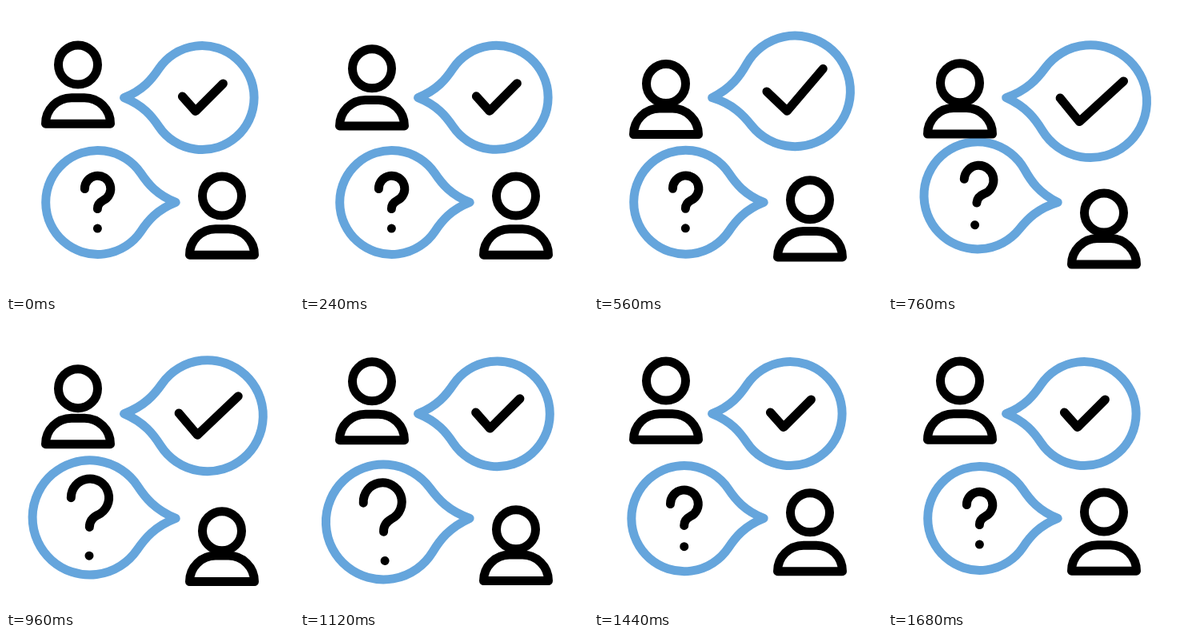
An HTML page that plays this animation: 360 px wide and 360 px high, repeating every 1720 ms.

```html
<!DOCTYPE html>
<html lang="en">
<head>
<meta charset="utf-8">
<title>Question and answer</title>
<style>
  html, body { margin: 0; width: 100%; height: 100%; overflow: hidden; background: #fff; }
  svg { display: block; }

  path, circle {
    fill: none;
    stroke: #000;
    stroke-width: 11px;
    stroke-linecap: round;
    stroke-linejoin: round;
    vector-effect: non-scaling-stroke;
  }
  .outline { stroke: #65a5dc; }

  .head, .body, .bubble, .mark {
    transform-origin: 0 0;
    animation: 1720ms cubic-bezier(.6, 0, .4, 1) var(--delay) infinite both;
  }
  .first { --delay: 0ms; --swell: 1.083; }
  .second { --delay: 320ms; --swell: 1.107; }

  .head { --drop: 23.7px; animation-name: nod; }
  .body { --drop: 13.4px; animation-name: nod; }
  .bubble {
    --grow: var(--swell);
    animation-name: swing, swell;
    animation-timing-function: cubic-bezier(.55, 0, .45, 1);
  }
  .mark {
    animation-name: swell;
    animation-timing-function: cubic-bezier(.55, 0, .45, 1);
  }
  .check { --grow: 1.42; }
  .query { --grow: 1.34; }

  @keyframes nod {
    0%, 2.3%, 70.9%, 100% { translate: 0 0; }
    34.9%, 38.4% { translate: 0 var(--drop); }
  }
  @keyframes swing {
    0%, 11.6%, 69.8%, 100% { rotate: 0deg; }
    27.9%, 29.7% { rotate: -5deg; }
    43.6% { rotate: 2.5deg; }
  }
  @keyframes swell {
    0%, 14.5%, 73.3%, 100% { scale: 1; }
    42.4%, 47.7% { scale: var(--grow); }
  }
</style>
</head>
<body>
<svg width="360" height="360" viewBox="0 0 360 360">
  <defs>
    <circle id="head" cx="90" cy="73.5" r="24.5"/>
    <path id="body" d="M49.5 147.2A32.5 32.5 0 0 1 82 114.7H98A32.5 32.5 0 0 1 130.5 147.2Z"/>
    <!-- the tip of the tail sits at the origin -->
    <path id="outline" class="outline" d="M0 0C24 -9.5 35 -23.5 43.6 -36.3A65 65 0 1 1 43.6 36.3C35 23.5 24 9.5 0 0Z"/>
  </defs>

  <g class="first" transform="translate(147.6 114.6)">
    <g class="bubble">
      <use href="#outline"/>
      <g transform="translate(97.8 0)">
        <g class="mark check"><path d="M-25 -1.6L-8.5 16.9L26 -17.6"/></g>
      </g>
    </g>
  </g>

  <g class="second" transform="translate(212.2 245.4) scale(-1 1)">
    <g class="bubble">
      <use href="#outline"/>
      <g transform="translate(97.8 0) scale(-1 1)">
        <g class="mark query">
          <path d="M-16 -16.8A16.2 16.2 0 1 1 7 -2.3Q0 1.3 0 8.2"/>
          <path d="M0 32.7h.01"/>
        </g>
      </g>
    </g>
  </g>

  <g class="first">
    <g class="head"><use href="#head"/></g>
    <g class="body"><use href="#body"/></g>
  </g>
  <g class="second" transform="translate(180 164)">
    <g class="head"><use href="#head"/></g>
    <g class="body"><use href="#body"/></g>
  </g>
</svg>
</body>
</html>
```
